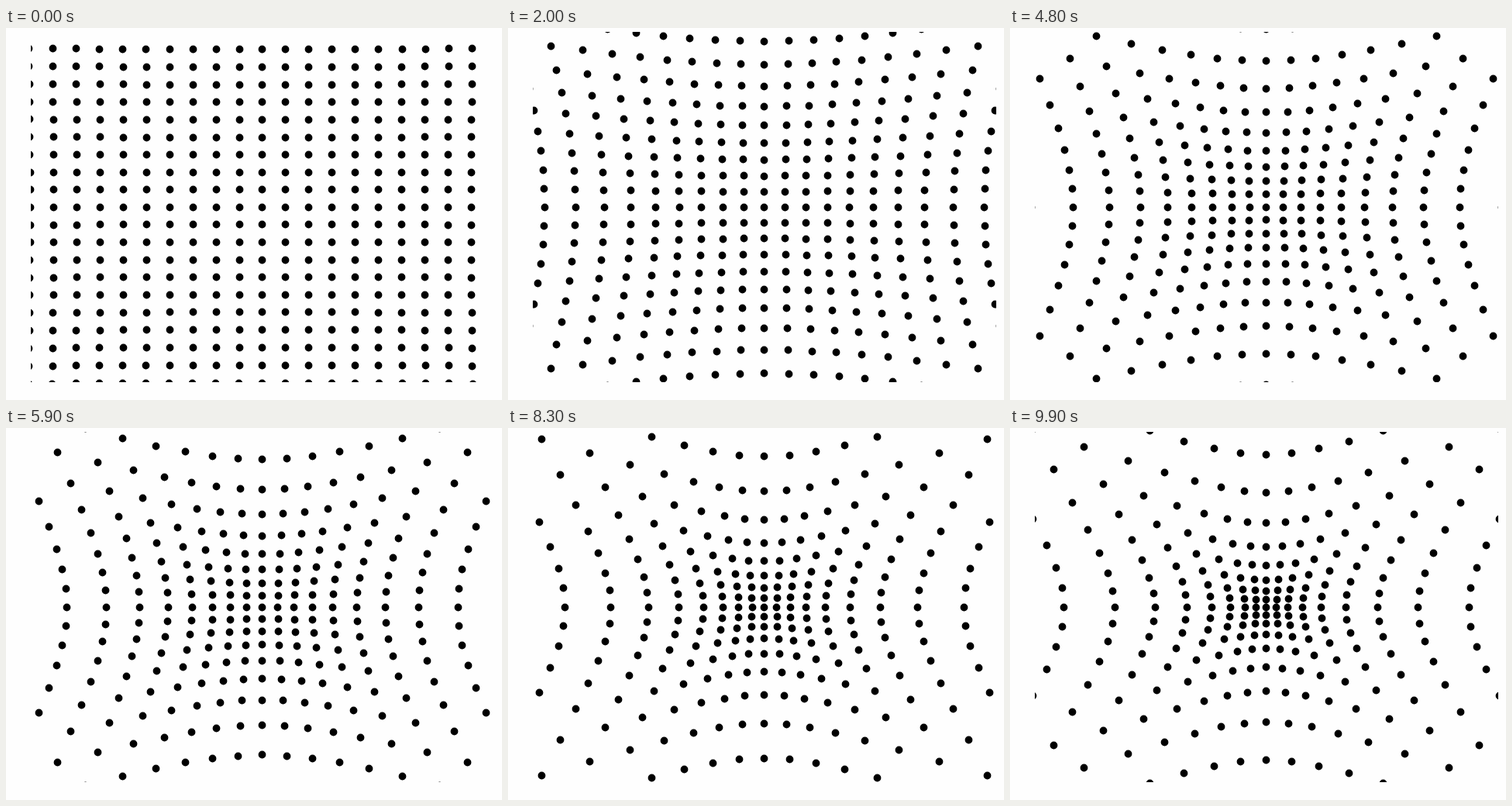
An HTML page with a canvas that plays this animation: 640 by 480 pixels, repeating every 10 s.

```html
<!DOCTYPE html>
<html lang="en">
<head>
<meta charset="utf-8">
<title>Pincushion distortion</title>
<style>
  html, body { margin: 0; width: 100%; height: 100%; overflow: hidden; background: #fefefe; }
  canvas { display: block; width: 640px; height: 480px; }
</style>
</head>
<body>
<canvas id="stage" width="640" height="480"></canvas>
<script>
const ctx = document.getElementById('stage').getContext('2d');

const STEP = 100, STEPS = 100;
const plot = { x: 32, y: 5, w: 598, h: 452 };
const center = { x: 330.95, y: 231.4 };
const unit = { x: 29.9, y: 22.6 };
const DOT = 4.9;
const FIXED_R2 = 55.2; // squared radius that stays in place

// Dots sit on whole pixels.
const snap = v => Math.floor(v) + 0.5;

const strength = i => 0.00006 + 0.0001005 * i + 4.2e-8 * i * i;

function draw(step) {
  const k = strength(step);
  ctx.fillStyle = '#fefefe';
  ctx.fillRect(0, 0, 640, 480);
  ctx.save();
  ctx.beginPath();
  ctx.rect(plot.x, plot.y, plot.w, plot.h);
  ctx.clip();
  ctx.fillStyle = '#000';
  ctx.beginPath();
  for (let gx = -10; gx < 10; gx++) {
    for (let gy = -10; gy < 10; gy++) {
      const scale = 1 + k * (gx * gx + gy * gy - FIXED_R2);
      const x = snap(center.x + gx * scale * unit.x);
      const y = snap(center.y - gy * scale * unit.y);
      ctx.moveTo(x + DOT, y);
      ctx.arc(x, y, DOT, 0, 2 * Math.PI);
    }
  }
  ctx.fill();
  ctx.restore();
}

let shown = -1;
function tick() {
  const step = Math.floor(performance.now() / STEP) % STEPS;
  if (step !== shown) draw(shown = step);
  requestAnimationFrame(tick);
}
tick();
</script>
</body>
</html>
```
